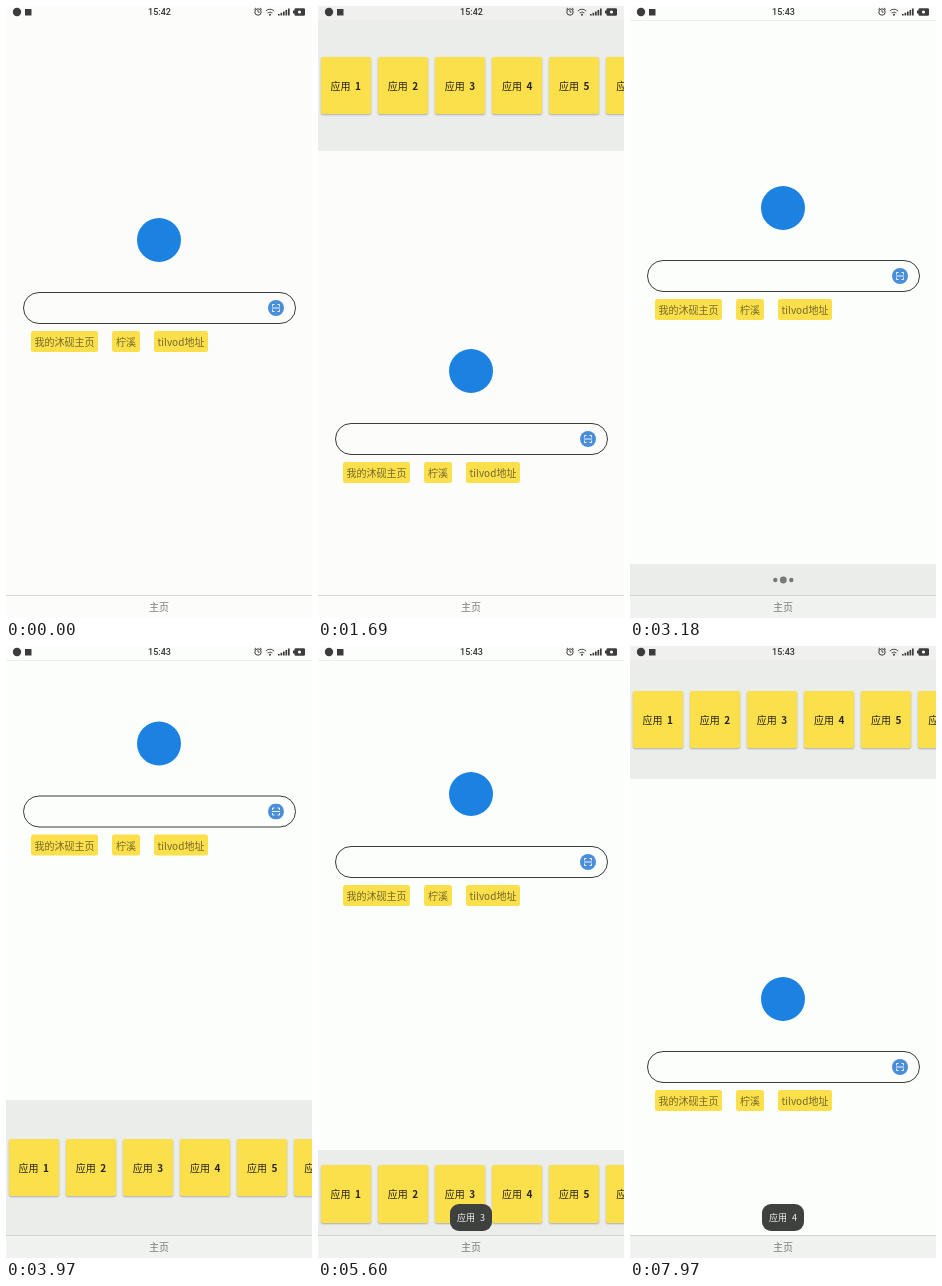
Write an HTML page that moves like this. It is 306 by 612 pixels and loops after 8 s.

```html
<!DOCTYPE html>
<html lang="zh">
<head>
<meta charset="utf-8">
<title>主页</title>
<style>
html, body { margin: 0; width: 100%; height: 100%; overflow: hidden; }
body { position: relative; background: #fcfcfa; font: 10px/1 "Noto Sans CJK SC", "Noto Sans CJK", sans-serif; }
body.late { background: #fcfefb; }
div, svg { position: absolute; box-sizing: border-box; }
#content { left: 0; top: 0; width: 306px; height: 350px; }
.logo { left: 131px; top: 212px; width: 44px; height: 44px; border-radius: 50%; background: #1b82e2; }
.search { left: 17px; top: 286px; width: 273px; height: 32px; border: 1.2px solid #3a3b3a; border-radius: 16px; }
.scan { left: 262px; top: 294px; }
.tag { top: 325px; height: 21px; line-height: 21px; border-radius: 2.5px; background: #fbe04c; color: #74672a; text-align: center; white-space: nowrap; }
#footer { left: 0; top: 589px; width: 306px; height: 23px; border-top: 1px solid #d3d4d3; line-height: 22px; text-align: center; color: #777; }
.late #footer { background: #f0f2ef; }
#panel { left: 0; width: 306px; overflow: hidden; background: #ebedeb; box-shadow: inset 0 -1px #d3d4d3; }
.down #panel { box-shadow: none; }
#tiles { left: 0; width: 400px; height: 58px; }
.tile { top: 0; width: 50px; height: 57.5px; border-radius: 2px; background: #fbe04c; color: #26231a; box-shadow: 0 1px 2px rgba(0,0,0,.28); text-align: center; line-height: 58px; font-weight: 500; white-space: pre; overflow: hidden; }
.press { inset: 0; background: #000; opacity: 0; }
#dots { left: 133px; width: 40px; height: 10px; overflow: visible; }
#status { left: 0; top: 0; width: 306px; height: 14px; }
.late #status { height: 15px; border-bottom: 1px solid #eceeeb; }
.down #status { background: #f0f1ef; }
#clock { left: 133px; top: 1px; width: 41px; text-align: center; font: 500 9px/11px Roboto, sans-serif; color: #333; }
#toast { left: 132px; top: 558px; width: 42px; height: 27px; border-radius: 9px; background: #3f413e; color: #f1f1f0; font-size: 9px; line-height: 27px; text-align: center; white-space: pre; word-spacing: .5px; }
</style>
</head>
<body>
<div id="content">
  <div class="logo"></div>
  <div class="search"></div>
  <svg class="scan" width="16" height="16" fill="none" stroke="#fff">
    <circle cx="8" cy="8" r="8" fill="#4a8ed9" stroke="none"/>
    <path d="M4.5 6.5v-2h2M9.5 4.5h2v2M11.5 9.5v2h-2M6.5 11.5h-2v-2M4 8h8" stroke-width=".9"/>
  </svg>
  <div class="tag" style="left:25px;width:67px">我的沐砚主页</div>
  <div class="tag" style="left:106px;width:28px">柠溪</div>
  <div class="tag" style="left:148px;width:54px">tilvod地址</div>
</div>
<div id="footer">主页</div>
<div id="panel">
  <div id="tiles"></div>
  <svg id="dots" fill="#777977"><circle cy="5"/><circle cy="5"/><circle cy="5"/></svg>
</div>
<div id="status">
  <svg width="306" height="14" fill="none" stroke="#3c3c3c">
    <g fill="#3c3c3c" stroke="none">
      <circle cx="11" cy="6" r="4.2"/>
      <rect x="19" y="3" width="6.5" height="6.5"/>
      <path d="M272 9.5v-1.5h1.7v1.5zM274.5 9.5v-2.7h1.7v2.7zM277 9.5v-4h1.7v4zM279.5 9.5v-5.4h1.7v5.4zM282 9.5v-7h1.7v7z"/>
      <circle cx="264" cy="8.8" r="1"/>
      <rect x="288.5" y="2.3" width="10.5" height="7.4" rx="1.2"/>
      <rect x="287" y="4.5" width="2" height="3"/>
    </g>
    <circle cx="293.5" cy="6" r="1.6" fill="#fcfefb" stroke="none"/>
    <circle cx="252" cy="6" r="3.2"/>
    <path d="M252 4v2.2h1.5M248.2 3.5l1.8-1.6M255.8 3.5l-1.8-1.6M259.8 5q4.2-3.6 8.4 0M261.6 7q2.4-2 4.8 0" stroke-width=".9"/>
  </svg>
  <div id="clock"></div>
</div>
<div id="toast"></div>
<script>
const LOOP = 8000, TOP = 14, BOTTOM = 590, TILE = 58, PAD = 15;
const $ = id => document.getElementById(id);
const clamp = x => Math.max(0, Math.min(1, x));

// [time, value] pairs; positive pull opens the top panel, negative the bottom one
const pullKeys = [[350, 0], [1140, 95], [1200, 100], [1480, 146], [1690, 131], [1770, 131],
  [1980, 30], [2060, 24], [2300, 6], [2600, 0], [3130, 0], [3180, -32], [3260, -32],
  [3600, -92], [3970, -136.5], [4090, -136.5], [4300, -170], [4400, -134], [4520, -100], [4670, -86],
  [6860, -86], [7060, -17], [7140, -17], [7190, 0], [7450, 52], [7680, 90], [7740, 94], [7960, 119]];
const toastKeys = [[5180, 0], [5540, 1], [6150, 1], [6320, 0], [6380, 0], [6510, .92], [6660, 1]];

function at(keys, t) {
  if (t <= keys[0][0]) return keys[0][1];
  for (let i = 1; i < keys.length; i++) {
    const [t0, a] = keys[i - 1], [t1, b] = keys[i];
    if (t < t1) return a + (b - a) * (t - t0) / (t1 - t0);
  }
  return keys[keys.length - 1][1];
}

const presses = [];
for (let i = 0; i < 6; i++) {
  const tile = document.createElement('div');
  tile.className = 'tile';
  tile.style.left = 2.7 + i * 57.15 + 'px';
  tile.innerHTML = `应用  <b>${i + 1}</b><div class="press"></div>`;
  presses.push(tile.lastChild);
  $('tiles').append(tile);
}
const dots = [...$('dots').children];

function press(i, t, start) {
  const p = clamp((t - start) / 350);
  presses[i].style.opacity = .14 * Math.sin(Math.PI * p);
}

function drawPanel(pull, open) {
  const h = Math.abs(pull), down = pull > 0;
  const pad = Math.max(PAD, (h - TILE) / 2);
  $('panel').style.top = (down ? TOP : BOTTOM - h) + 'px';
  $('panel').style.height = h + 'px';
  $('tiles').style.top = (down ? h - pad - TILE : pad) + 'px';
  $('tiles').style.opacity = open ? 1 : clamp((h - 60) / 25);
  $('dots').style.top = h / 2 - 5 + 'px';
  $('dots').style.opacity = open ? 0 : 1 - clamp((h - 55) / 25);
  const spread = 8 * clamp((h - 15) / 16);
  dots.forEach((dot, i) => {
    dot.setAttribute('cx', 20.3 + (i - 1) * spread);
    dot.setAttribute('r', (i === 1 ? 3.4 : 2.2) * clamp(h / 20));
  });
}

function draw(t) {
  const pull = at(pullKeys, t);
  $('content').style.transform = `translateY(${pull}px)`;
  drawPanel(pull, t > 4300 && t < 7190);
  document.body.classList.toggle('down', pull > 0);
  document.body.classList.toggle('late', t >= 2600);
  $('clock').textContent = t < 2750 ? '15:42' : '15:43';
  $('toast').textContent = '应用  ' + (t < 6350 ? 3 : 4);
  $('toast').style.opacity = at(toastKeys, t);
  press(2, t, 5170);
  press(3, t, 6150);
}

const start = performance.now();
function frame() {
  draw((performance.now() - start) % LOOP);
  requestAnimationFrame(frame);
}
frame();
</script>
</body>
</html>
```
